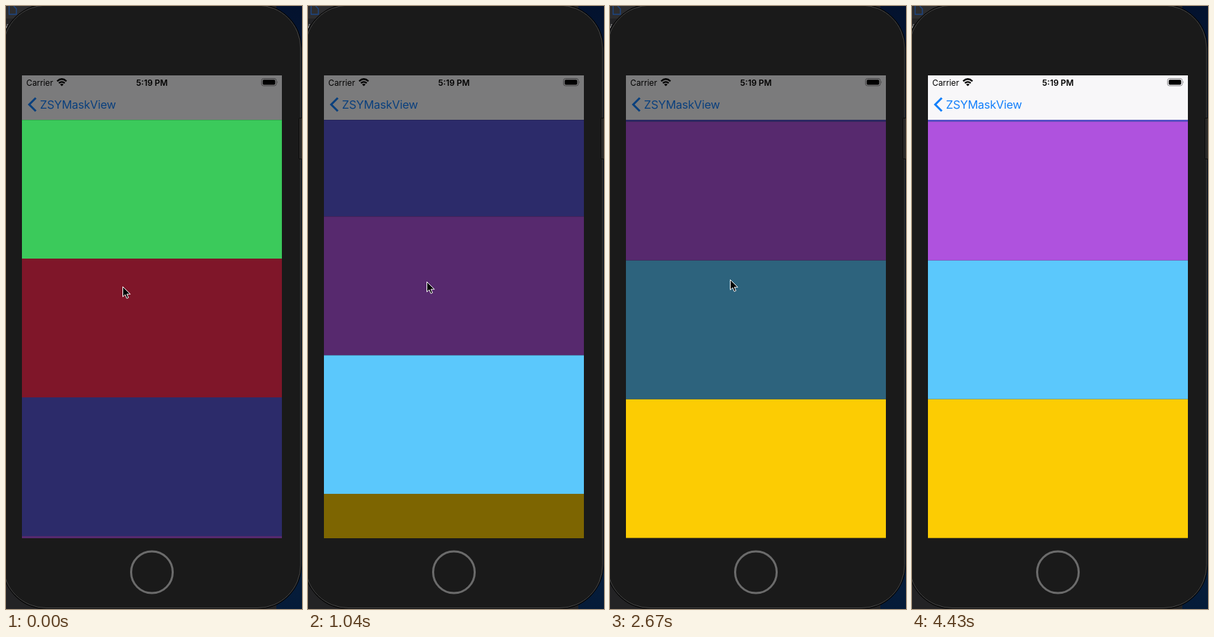
Recreate the animation shown at these times as an HTML page. Size 427x869 px, loop 5.18 s.

```html
<!DOCTYPE html>
<html lang="en">
<head>
<meta charset="utf-8">
<title>Mask view demo</title>
<style>
  html, body { margin: 0; width: 100%; height: 100%; overflow: hidden; background: #1a1a1a; }
  svg { display: block; width: 427px; height: 869px; }
  text { font-family: Inter, Roboto, sans-serif; }
</style>
</head>
<body>
<svg viewBox="0 0 427 869">
  <defs>
    <clipPath id="content"><rect x="23" y="164" width="375" height="603"/></clipPath>
    <linearGradient id="sky" x2="0" y2="1">
      <stop offset="0" stop-color="#03122e"/>
      <stop offset=".5" stop-color="#0a2a52"/>
      <stop offset="1" stop-color="#051b38"/>
    </linearGradient>
  </defs>

  <!-- desktop behind the phone -->
  <rect width="427" height="869" fill="#232325"/>
  <rect width="36" height="18" fill="#2d2d2f"/>
  <path d="M4.500 -1V12H15V4L11 0" fill="none" stroke="#1d4684" stroke-width="1.400"/>
  <text x="-3" y="32" font-size="12" font-weight="700" fill="#aaa" style="font-family:'Liberation Serif',serif">v</text>
  <rect x="390" width="37" height="869" fill="url(#sky)"/>

  <!-- phone -->
  <rect x="-4" y="-1" width="429" height="868.500" rx="62" fill="#1a1a1a" stroke="#050505" stroke-width="3"/>
  <rect x="-4" y="-1" width="429" height="868.500" rx="62" fill="#1a1a1a" stroke="#484848"/>
  <rect x="422.500" y="161.500" width="8" height="59" rx="1.500" fill="#2b2a29" stroke="#0c0c0c"/>
  <circle cx="210.500" cy="816" r="30" fill="none" stroke="#6b6b6b" stroke-width="3"/>

  <!-- screen -->
  <g id="rows" clip-path="url(#content)"></g>
  <rect x="23" y="100" width="375" height="64" fill="#f8f7f9"/>
  <rect x="23" y="164" width="375" height=".5" opacity=".3"/>
  <text x="29.300" y="114.700" font-size="11.800">Carrier</text>
  <text x="210.500" y="114.700" font-size="11.900" font-weight="600" text-anchor="middle">5:19 PM</text>
  <g fill="none" stroke="#000" stroke-width="2.300">
    <path d="M73.800 108.300Q80.500 102.300 87.200 108.300M76.300 111.200Q80.500 107.500 84.700 111.200"/>
    <path d="M78 112.900Q80.500 111 83 112.900L80.500 115.500Z" fill="#000" stroke="none"/>
  </g>
  <rect x="368.500" y="104.500" width="21.500" height="10.500" rx="3" fill="none" stroke="#8d8c8f"/>
  <rect x="370.300" y="106.200" width="18" height="7.200" rx="1.600"/>
  <path d="M391.200 108q1.500 1.800 0 3.600z" fill="#8d8c8f"/>
  <path d="M43 132.500L33.500 142L43 151.500" fill="none" stroke="#1480fb" stroke-width="3"/>
  <text x="49" y="148" font-size="16.500" letter-spacing="-.25" fill="#1480fb">ZSYMaskView</text>
  <path id="mask" fill-rule="evenodd"/>

  <path id="cursor" d="M.5 .5V15L3.900 11.900L6.200 17.400L8.700 16.300L6.400 11.200H11.300Z" stroke="#fff" stroke-linejoin="round"/>
</svg>
<script>
const LOOP = 5180, TICK = 148; // the screen refreshes once per tick
const TOP = 164, ROW = 200;
const colors = ['#3bca5b', '#ff2d52', '#5856d6', '#af52de', '#5bc8fc', '#fccc03'];
const SCROLL_MS = 300;
const moves = [{ start: 79, by: 460.7, row: 4 }, { start: 1445, by: 136.6, row: 5 }];
const LEAVE = 25; // tick at which the pointer darts away
const exit = [[199, 531], [174, 625], [174, 618], [235, 644], [302, 855]];

const get = id => document.getElementById(id);
const rows = get('rows'), mask = get('mask'), cursor = get('cursor');
rows.innerHTML = colors.map(c =>
  `<rect x="23" width="375" height="${ROW}" fill="${c}"/>`).join('');
const strips = [...rows.children];

const ramp = (t, start, ms) => Math.min(1, Math.max(0, (t - start) / ms));
const ease = (t, start, ms) => (1 - Math.cos(Math.PI * ramp(t, start, ms))) / 2;
const box = (y, h) => `M23 ${y}h375v${h}h-375z`;

// The hole closes while the list scrolls and opens on the next row.
function openRow(t) {
  const last = moves.findLast(m => t >= m.start);
  if (!last) return 0;
  return t < last.start + SCROLL_MS ? -1 : last.row;
}

function pointer(tick, t) {
  if (tick >= LEAVE) return exit[tick - LEAVE];
  const nudge = ramp(t, 460, 576), drift = ramp(t, 2072, 1036);
  return [168 + 3 * nudge + 3 * drift, 404 - 7 * nudge ** 3 - 6 * drift].map(Math.round);
}

function draw() {
  const tick = Math.floor((performance.now() % LOOP + 10) / TICK), t = tick * TICK;
  const offset = moves.reduce((sum, m) => sum + m.by * ease(t, m.start, SCROLL_MS), 0);
  const top = i => TOP + i * ROW - offset;
  const open = openRow(t), spot = pointer(tick, t);

  strips.forEach((strip, i) => strip.setAttribute('y', top(i)));
  mask.setAttribute('d', box(100, 667) + (open < 0 ? '' : box(top(open), ROW)));
  mask.setAttribute('opacity', .5 * (1 - ease(t, 3325, 250)));
  cursor.setAttribute('visibility', spot ? 'visible' : 'hidden');
  if (spot) cursor.setAttribute('transform', `translate(${spot})`);
  requestAnimationFrame(draw);
}
draw();
</script>
</body>
</html>
```
